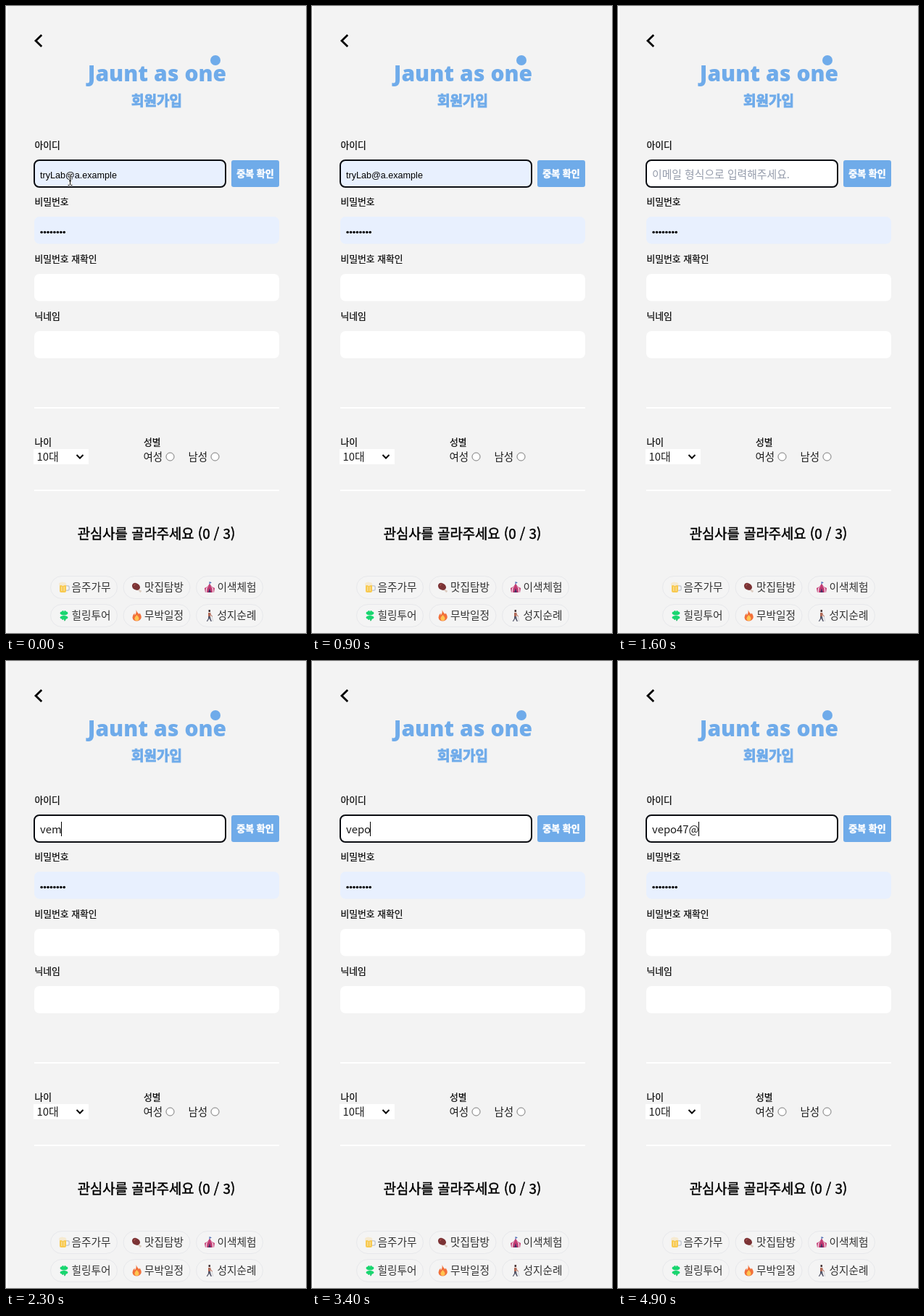
Write an HTML page that moves like this. It is 414x866 px and loops after 5 s.

```html
<!DOCTYPE html>
<html lang="ko">
<head>
<meta charset="utf-8">
<title>회원가입</title>
<style>
  html, body { margin: 0; width: 100%; height: 100%; overflow: hidden; background: #f3f3f3; }
  svg { display: block; width: 414px; height: 866px; }
  text { font: 14.85px "Noto Sans CJK KR", "Noto Sans CJK JP", "Noto Sans", sans-serif; fill: #1c1c1c; white-space: pre; }
  .label { font-size: 12.8px; fill: #000; stroke: #000; stroke-width: .2px; }
  .option { font-size: 14.5px; }
  .chip { font-size: 14.7px; fill: #333; }
  .heading { font-size: 18.8px; fill: #000; stroke: #000; stroke-width: .5px; text-anchor: middle; }
  .brand { font: 800 30px "Open Sans", "Noto Sans", sans-serif; fill: #6fabea; text-anchor: middle; }
  .subtitle { font-size: 19px; font-weight: 700; fill: #6fabea; stroke: #6fabea; stroke-width: .9px; text-anchor: middle; }
  .button { font-size: 13px; font-weight: 700; fill: #fff; stroke: #fff; stroke-width: .45px; text-anchor: middle; }
  .autofill { font: 12.6px "Liberation Sans", sans-serif; fill: #000; }
  .placeholder { fill: #959cab; }
</style>
</head>
<body>
<svg id="stage" viewBox="0 0 414 866">
  <rect width="414" height="866" fill="#f3f3f3"/>
  <rect width="2" height="866" fill="#fff"/>
  <path d="M49.2 40 L41 48 L49.2 56" fill="none" stroke="#000" stroke-width="2.8"/>

  <circle cx="289" cy="75" r="7" fill="#6fabea"/>
  <text class="brand" x="208.5" y="104">Jaunt as one</text>
  <text class="subtitle" x="208" y="138">회원가입</text>

  <rect id="idBox" x="39" y="213" width="264" height="37" rx="7" stroke="#0b0d12" stroke-width="2"/>
  <text id="idText" x="47" y="238"></text>
  <rect id="caret" y="222" width="1" height="20" fill="#000"/>
  <rect x="311" y="213" width="66" height="37" rx="3" fill="#6fabe9"/>
  <text class="button" x="344" y="236">중복 확인</text>

  <g id="form"></g>

  <path d="M39 555H377M39 669H377" stroke="#fff" stroke-width="2"/>
  <rect x="38" y="612" width="76" height="21" fill="#fff"/>
  <text x="42.5" y="628">10대</text>
  <path d="M97.5 620 L102 624.5 L106.5 620" fill="none" stroke="#000" stroke-width="2"/>
  <text class="heading" x="207.5" y="736">관심사를 골라주세요 (0 / 3)</text>

  <g id="chips"></g>

  <g id="pointer" fill="none">
    <path id="beam" d="M85.5 232.5H87.5L88.5 233.5L89.5 232.5H91.5M88.5 233.5V246.5M85.5 247.5H87.5L88.5 246.5L89.5 247.5H91.5M87 241.5H90" stroke="#000"/>
  </g>
</svg>
<script>
const $ = id => document.getElementById(id);

function add(parent, tag, attrs, content = "") {
  const node = document.createElementNS("http://www.w3.org/2000/svg", tag);
  for (const key in attrs) node.setAttribute(key, attrs[key]);
  node.textContent = content;
  parent.appendChild(node);
  return node;
}

const labels = [
  [39.5, 197, "아이디"], [39.5, 275, "비밀번호"], [39.5, 354, "비밀번호 재확인"],
  [39.5, 433, "닉네임"], [39.5, 607, "나이"], [190, 607, "성별"]
];
for (const [x, y, name] of labels) add($("form"), "text", { class: "label", x, y }, name);

for (const [y, fill] of [[291, "#e8f0fe"], [370, "#fff"], [449, "#fff"]])
  add($("form"), "rect", { x: 39, y, width: 338, height: 37.5, rx: 7, fill });

for (let i = 0; i < 8; i++)
  add($("form"), "circle", { cx: 49.1 + 4.45 * i, cy: 312.5, r: 1.8, fill: "#000" });

for (const [x, name] of [[189.5, "여성"], [251.5, "남성"]]) {
  add($("form"), "text", { class: "option", x, y: 628 }, name);
  add($("form"), "circle", { cx: x + 37, cy: 622.5, r: 5.5, fill: "#fff", stroke: "#767676" });
}

// Icon paths live in a 16 x 16 box: [fill, path].
const chips = [
  ["음주가무", [
    ["#c9cdd6", "M10 5h3q3 0 3 3v2q0 3-3 3h-3v-1.500h2.500q2 0 2-2v-1q0-2-2-2H10z"],
    ["#f8c94f", "M2 4h9v9q0 2-2 2H4q-2 0-2-2z"],
    ["#f9dc8c", "M4 7h1.500v6H4zM7.500 7H9v6H7.500z"],
    ["#f6ead0", "M1 4q0-3 3-3 1-1 3 0 4-.5 4.500 3-1 2-3 1-2 2-4 0-3 1-3.500-1z"]]],
  ["맛집탐방", [
    ["#dccbc0", "M9 9l4 3q2 0 1.500 1.500-1 .5-1 1.500-2 0-2-1.500L8 11z"],
    ["#7b3335", "M1.500 5Q3 1 7 2q6 2 5.500 7-2 4-6 2.500Q1 10 1.500 5z"],
    ["#a5504c", "M3.500 5.500q1-3 4-2-2 0-2.500 3z"]]],
  ["이색체험", [
    ["#4f6fb5", "M7.500 0L11 1.300 8.500 2.600V4h-1z"],
    ["#c23a72", "M8 3l3 4 4 2-1 6H2L1 9l4-2z"],
    ["#f1dbe6", "M7 6L4.500 9 4 15H2.500L3 9zM9 6l2.500 3 .5 6h1.500L13 9z"],
    ["#4b2f63", "M8 9l2 6H6z"]]],
  ["힐링투어", [
    ["#10b35c", "M7.500 8h1l1.500 7-1.500.5z"],
    ["#18d66f", "M8 7.500Q3 7 2.500 4.500 3 2 5 2.500 5.500.5 7 1 8.500 2 8 7.500zM8 7.500Q7.500 2 9 1q1.500-.5 2 1.500 2-.5 2.500 2Q13 7 8 7.500zM8 8Q3 8 2.500 10.500 3 13 5 12.500q.5 2 2 1.500Q8.500 13 8 8zM8 8q-.5 5 1 6 1.500.5 2-1.500 2 .5 2.500-2Q13 8 8 8z"]]],
  ["무박일정", [
    ["#f2703a", "M7 0q1 3 4 6l1-1.500q3 4 2 7Q12 15.500 8 15.500 2.500 15.500 2 10.500q0-3.500 3-6v3Q8 5 7 0z"],
    ["#ffc552", "M8 7q3 3 3 5 0 3-3 3t-3-3q0-2 3-5z"]]],
  ["성지순례", [
    ["#c9cbd0", "M11 9h.8l1.200 7h-.8z"],
    ["#4a3a3c", "M6.500 0h2.500v3H6.500z"],
    ["#b06a58", "M6 4h3.500v2l2.500 3-.7.6L9 7v3H6z"],
    ["#56586b", "M6 9h3l.5 3 1.500 4H9.500L7.500 12 5 16H3.700L6 12z"]]]
];
chips.forEach(([name, icon], i) => {
  const x = 61 + 100.5 * (i % 3), y = 787 + 39 * (i > 2);
  add($("chips"), "rect", { x: x + .5, y: y + .5, width: 92, height: 31, rx: 15.5, fill: "#f4f4f4", stroke: "#e7e8eb" });
  const group = add($("chips"), "g", { transform: `translate(${x + 11} ${y + 8})` });
  for (const [fill, d] of icon) add(group, "path", { fill, d });
  add($("chips"), "text", { class: "chip", x: x + 29.5, y: y + 21 }, name);
});

const halo = $("beam").cloneNode();
halo.removeAttribute("id");
halo.setAttribute("stroke", "#fff");
halo.setAttribute("stroke-width", 2.5);
$("pointer").prepend(halo);

const LOOP = 5000, BLINK = 500, POINTER_HIDES = 500;
const edits = [
  [0, "tryLab@a.example"], [1100, ""], [1900, "v"], [2100, "ve"], [2300, "vem"],
  [2700, "ve"], [3000, "vep"], [3200, "vepo"], [3800, "vepo4"], [4400, "vepo47"], [4700, "vepo47@"]
];

function render(time) {
  const [since, value] = edits.filter(([at]) => at <= time).pop();
  const untouched = since === 0;
  const text = $("idText");
  text.setAttribute("class", untouched ? "autofill" : value ? "" : "placeholder");
  text.setAttribute("y", untouched ? 238 : 237.5);
  text.textContent = value || "이메일 형식으로 입력해주세요.";
  $("idBox").setAttribute("fill", untouched ? "#e8f0fe" : "#fff");

  const caretOn = !untouched && (time - since) % (2 * BLINK) < BLINK;
  $("caret").setAttribute("visibility", caretOn ? "visible" : "hidden");
  $("caret").setAttribute("x", 47 + (value ? Math.round(text.getComputedTextLength()) - 1 : 0));
  $("pointer").setAttribute("visibility", time < POINTER_HIDES ? "visible" : "hidden");
}

const start = performance.now();
function tick() {
  render((performance.now() - start) % LOOP);
  requestAnimationFrame(tick);
}
tick();
</script>
</body>
</html>
```
